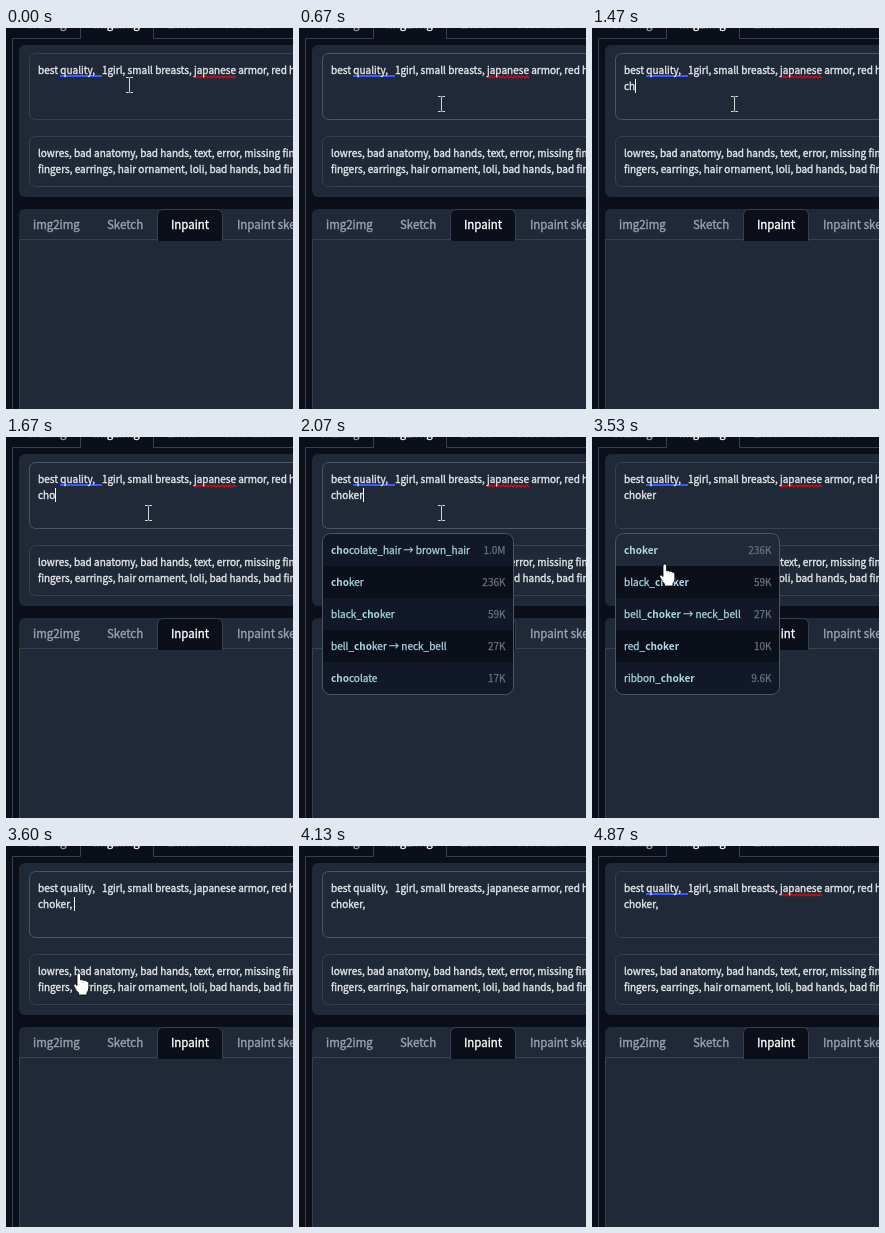
An HTML page for the animation above (4990 ms loop, 287 by 381 pixels).

```html
<!DOCTYPE html>
<html lang="en">
<head>
<meta charset="utf-8">
<title>Tag completion</title>
<style>
html, body { margin: 0; width: 100%; height: 100%; overflow: hidden; background: #0b0f19; }
svg { display: block; width: 287px; height: 381px; }
text { font: 10.03px "Noto Sans CJK JP", "Noto Sans CJK SC", "Noto Sans CJK", "Noto Sans", sans-serif; fill: #e5e7eb; stroke: #e5e7eb; stroke-width: .35; white-space: pre; }
.tab { font-size: 11.46px; fill: #9ca3af; stroke: #9ca3af; }
.on { fill: #fff; stroke: #fff; }
.tag { fill: #add8e6; stroke: #add8e6; stroke-width: .25; }
.tag tspan { font-weight: 700; stroke: none; }
.num { fill: #6b7280; stroke: #6b7280; stroke-width: .25; text-anchor: end; }
.line { fill: none; stroke: #374151; }
.box { fill: #1f2937; stroke: #374151; }
.pane { fill: #1f2937; }
</style>
</head>
<body>
<svg viewBox="0 0 287 381">
  <text class="tab" x="20" y="0">txt2img</text>
  <text class="tab on" x="87" y="0">img2img</text>
  <text class="tab" x="161" y="0">Extras</text>
  <text class="tab" x="219" y="0">PNG Info</text>
  <path class="line" d="M6.5 381V10.5H74.5V0M147.5 0V10.5H287"/>

  <rect class="pane" x="13" y="17" width="290" height="152" rx="6"/>
  <rect class="box" id="prompt" x="23.5" y="25.5" width="290" height="66" rx="6"/>
  <rect class="box" x="23.5" y="108.5" width="290" height="50" rx="6"/>
  <g id="marks" fill="none">
    <path d="M54 48H96" stroke="#3d5afe" stroke-width="2"/>
    <path id="wave" stroke="#e00b12" stroke-width="1.2"/>
  </g>
  <text x="32" y="46">best quality,   1girl, small breasts, japanese armor, red hair,</text>
  <text id="typed" x="32" y="62"></text>
  <rect id="caret" y="51" width="1" height="14" fill="#fff"/>
  <text x="32" y="129">lowres, bad anatomy, bad hands, text, error, missing fingers,</text>
  <text x="32" y="145">fingers, earrings, hair ornament, loli, bad hands, bad fingers</text>

  <path class="pane" d="M13 381V187Q13 181 19 181H287V381Z"/>
  <path class="line" d="M13.5 381V211.5H287"/>
  <path d="M151.5 213V187.5Q151.5 181.5 157.5 181.5H210.5Q216.5 181.5 216.5 187.5V213" fill="#0b0f19" stroke="#374151"/>
  <text class="tab" x="27" y="201">img2img</text>
  <text class="tab" x="101" y="201">Sketch</text>
  <text class="tab on" x="165" y="201">Inpaint</text>
  <text class="tab" x="231" y="201">Inpaint sketch</text>

  <g id="lists"></g>
  <g id="pointer">
    <path id="beam" d="M-3.5 -7.5H-1Q0 -7.5 0 -6.5Q0 -7.5 1 -7.5H3.5M0 -6.5V6.5M-3.5 7.5H-1Q0 7.5 0 6.5Q0 7.5 1 7.5H3.5" fill="none" stroke="#d5d8dc"/>
    <path id="hand" d="M-2 2Q-2 0 -.2 0Q1.6 0 1.6 2V7Q3 5.8 4.6 7.4Q6.2 6.4 7.4 8.2Q9.6 7.6 9.8 10V15Q9.6 18 8 19.5V22H-.5V20Q-3 17.5 -4.2 14.6Q-6 12.4 -5 11.2Q-3.6 10.2 -2 12.6Z" fill="#fff" stroke="#000" stroke-width=".8"/>
    <path id="arrow" d="M0 0V16.5L3.8 13L6.3 18.8L8.8 17.7L6.4 12H11.6Z" fill="#fff" stroke="#000" stroke-width=".8"/>
  </g>
</svg>
<script>
const LOOP = 4990;
const $ = id => document.getElementById(id);
const show = (el, on) => el.setAttribute('display', on ? 'inline' : 'none');

// Tracks: [start ms, value]; each value holds until the next start.
const typed = [[0, ''], [1400, 'c'], [1470, 'ch'], [1670, 'cho'], [1870, 'chok'],
  [2000, 'choke'], [2070, 'choker'], [3600, 'choker, ']];
const caret = [[0, 0], [870, 1], [2600, 0], [3130, 1], [3530, 0], [3600, 1],
  [4130, 0], [4670, 1], [4870, 0]];
const focus = [[0, 0], [330, 1], [3530, 0], [3600, 1], [4870, 0]];
const marks = [[0, 1], [3600, 0], [4600, 1]];
const list = [[0, -1], [1730, 0], [2200, 1], [3600, -1]];
const hover = [[0, 0], [2930, 1], [3600, 0]];
const pointer = [
  [0, ['beam', 123.5, 57]], [70, ['beam', 121.5, 63]], [130, ['beam', 119.5, 69]],
  [600, ['beam', 154.5, 76]], [670, ['beam', 142.5, 76]],
  [2870, ['beam', 132.5, 85]], [2930, ['hand', 112, 101]], [3070, ['hand', 85, 121]],
  [3130, ['hand', 73, 127]],
  [3930, ['beam', 70.5, 147]], [4000, ['arrow', 62, 210]], [4070, ['arrow', 53, 299]],
  [4130, ['none', 0, 0]]
];
const at = (track, t) => track.findLast(k => k[0] <= t)[1];

const wave = Array.from({ length: 22 }, (_, i) => `${188 + i * 2} ${i % 2 ? 50 : 48}`);
$('wave').setAttribute('d', 'M' + wave.join('L'));

function popup(width, word, rows) {
  const clip = 'clip' + word;
  const frame = `x="23.5" y="96.5" width="${width - 1}" height="161" rx="8"`;
  const items = rows.map(([tag, count], i) => {
    const y = 97 + i * 32;
    const label = tag.replace(word, '<tspan>$&</tspan>');
    return `<rect class="row" x="23" y="${y}" width="${width}" height="32" fill="${i % 2 ? '#0b0f19' : '#111827'}"/>
      <text class="tag" x="32" y="${y + 20}">${label}</text>
      <text class="num" x="${14.5 + width}" y="${y + 20}">${count}</text>`;
  });
  return `<g><clipPath id="${clip}"><rect ${frame}/></clipPath>
    <g clip-path="url(#${clip})">${items.join('')}</g>
    <rect ${frame} fill="none" stroke="#4b5563"/></g>`;
}

$('lists').innerHTML =
  popup(192, 'cho', [['chocolate_hair → brown_hair', '1.0M'], ['choker', '236K'],
    ['black_choker', '59K'], ['bell_choker → neck_bell', '27K'], ['chocolate', '17K']]) +
  popup(165, 'choker', [['choker', '236K'], ['black_choker', '59K'],
    ['bell_choker → neck_bell', '27K'], ['red_choker', '10K'], ['ribbon_choker', '9.6K']]);
const lists = [...$('lists').children];
const firstRow = lists[1].querySelector('.row');

function draw(t) {
  $('typed').textContent = at(typed, t);
  $('caret').setAttribute('x', 32 + Math.round($('typed').getComputedTextLength() - .3));
  show($('caret'), at(caret, t));
  $('prompt').style.stroke = at(focus, t) ? '#4b5563' : '#374151';
  show($('marks'), at(marks, t));
  lists.forEach((el, i) => show(el, i === at(list, t)));
  firstRow.setAttribute('fill', at(hover, t) ? '#1f2937' : '#111827');
  const [shape, x, y] = at(pointer, t);
  for (const id of ['beam', 'hand', 'arrow']) show($(id), id === shape);
  $('pointer').setAttribute('transform', `translate(${x} ${y})`);
}

const start = performance.now();
function tick() {
  draw((performance.now() - start) % LOOP);
  requestAnimationFrame(tick);
}
tick();
</script>
</body>
</html>
```
